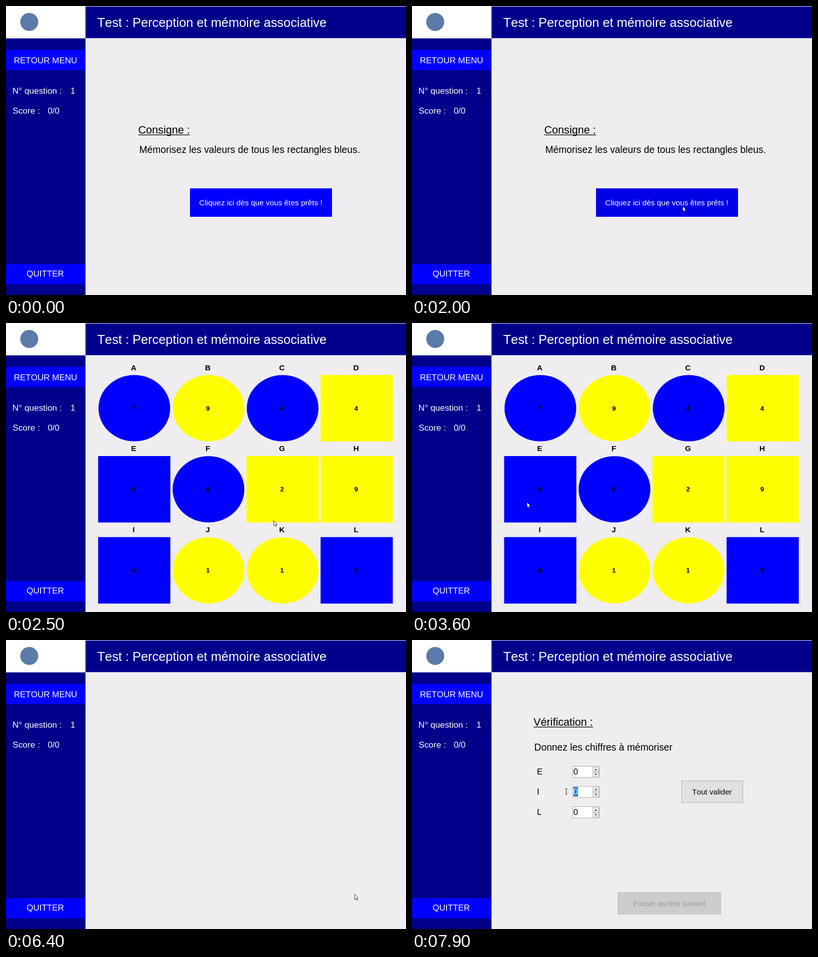
Write an HTML page that moves like this. It is 800 px wide and 580 px high and loops after 8000 ms.

```html
<!DOCTYPE html>
<html lang="fr">
<head>
<meta charset="utf-8">
<title>Perception et mémoire associative</title>
<style>
  html, body { margin: 0; width: 100%; height: 100%; overflow: hidden; background: #efedf0; }
  svg { display: block; width: 800px; height: 580px; }
  text { font-family: "Liberation Sans", Arial, sans-serif; font-kerning: none; white-space: pre; }
</style>
</head>
<body>
<svg id="stage" viewBox="0 0 800 580" xmlns="http://www.w3.org/2000/svg"></svg>
<script>
const NS = "http://www.w3.org/2000/svg";
const LOOP = 8000, STEP = 100;
const NAVY = "#00008b", BLUE = "#0000ff", YELLOW = "#ffff00";
const stage = document.getElementById("stage");

function add(parent, tag, attrs, content) {
  const node = document.createElementNS(NS, tag);
  for (const key in attrs) node.setAttribute(key, attrs[key]);
  if (content !== undefined) node.textContent = content;
  parent.appendChild(node);
  return node;
}
const group = () => add(stage, "g", {});
const box = (parent, x, y, width, height, fill, extra) =>
  add(parent, "rect", { x, y, width, height, fill, ...extra });
const label = (parent, content, x, y, size, fill = "#000", extra) =>
  add(parent, "text", { x, y, "font-size": size, fill, ...extra }, content);
const centred = { "text-anchor": "middle" };
const show = (node, on) => node.setAttribute("visibility", on ? "visible" : "hidden");

function heading(parent, content, x, y, width) {
  label(parent, content, x, y, 21.6);
  box(parent, x, y + 2, width, 1.3, "#000");
}

// Frame of the application
function buildShell() {
  const g = group();
  box(g, 0, 0, 800, 580, "#efedf0");
  box(g, 0, 0, 159, 65, "#fff");
  add(g, "circle", { cx: 46.5, cy: 32, r: 18, fill: "#5b7ba8" });
  box(g, 159, 1, 641, 63.5, NAVY);
  box(g, 0, 65, 159, 515, NAVY);
  box(g, 0, 88, 159, 40.5, BLUE);
  box(g, 0, 518, 159, 40.5, BLUE);
  label(g, "Test : Perception et mémoire associative", 182.5, 41.5, 25.4, "#fff");
  label(g, "RETOUR MENU", 79, 115, 17, "#fff", centred);
  label(g, "N° question :", 12.7, 176, 17.3, "#fff");
  label(g, "1", 129, 176, 17, "#fff");
  label(g, "Score :", 13.2, 216, 17.3, "#fff");
  label(g, "0/0", 83.4, 216, 17, "#fff");
  label(g, "QUITTER", 78.5, 543, 17, "#fff", centred);
}

function buildIntro() {
  const g = group();
  heading(g, "Consigne :", 264.5, 256, 103.5);
  label(g, "Mémorisez les valeurs de tous les rectangles bleus.", 266.5, 294.5, 19.3);
  const ready = box(g, 368, 366, 284, 57, BLUE);
  label(g, "Cliquez ici dès que vous êtes prêts !", 386.3, 400, 15.4, "#fff");
  return { g, ready };
}

// Each cell: round or square, blue or yellow, digit
function buildGrid() {
  const g = group();
  const cells = "rb7 ry9 rb4 sy4 sb0 rb6 sy2 sy9 sb4 ry1 ry1 sb9".split(" ");
  const bold = { ...centred, "font-weight": "bold" };
  cells.forEach(([shape, colour, digit], i) => {
    const col = i % 4, row = Math.floor(i / 4);
    const cx = 256.3 + col * 148.3, cy = 171 + row * 162.7;
    const fill = colour === "b" ? BLUE : YELLOW;
    if (shape === "r") add(g, "ellipse", { cx: cx + 0.4, cy, rx: 71.7, ry: 66.5, fill });
    else box(g, cx - 72, cy - 66.7, 144.4, 133.4, fill);
    label(g, "ABCDEFGHIJKL"[i], cx - 1, 95 + row * 162.3, 15.4, "#000", bold);
    label(g, digit, cx - 0.8, 175.5 + row * 162.6, 13, "#000", bold);
  });
  return g;
}

function spinner(g, name, y) {
  label(g, name, 250, y + 17, 17);
  box(g, 321.5, y + 0.5, 53, 22.5, "#fff", { stroke: "#a9a9a9" });
  for (const dy of [2, 12]) {
    box(g, 361.5, y + dy + 0.3, 12, 9, "#efefef", { stroke: "#adadad", "stroke-width": 0.8 });
    const tip = dy === 2 ? -3 : 3, mid = y + dy + 5;
    add(g, "path", { d: `M365 ${mid - tip / 2}h5l-2.5 ${tip}z`, fill: "#333" });
  }
  return label(g, "0", 322.7, y + 17, 16.5);
}

function buildCheck() {
  const g = group();
  heading(g, "Vérification :", 243, 172, 119);
  label(g, "Donnez les chiffres à mémoriser", 244.5, 222, 19.3);
  spinner(g, "E", 253);
  const digit = spinner(g, "I", 293);
  spinner(g, "L", 334);
  const mark = box(g, 323, 295, 9, 19, "#0078d7");
  g.insertBefore(mark, digit);
  const submit = box(g, 539.5, 282.8, 122, 43.5, "#e1e1e1", { stroke: "#adadad" });
  label(g, "Tout valider", 600, 310, 15.2, "#000", centred);
  box(g, 411.5, 506.5, 206, 43.5, "#cccccc", { stroke: "#bfbfbf" });
  label(g, "Passer au test suivant", 514.5, 533.5, 14.8, "#9b9b9b", centred);
  return { g, digit, mark, submit };
}

buildShell();
const intro = buildIntro();
const grid = buildGrid();
const check = buildCheck();
const arrow = add(stage, "path", {
  d: "M.5 .5V11L2.8 8.9L4.4 12.4L6 11.7L4.5 8.3H7.4Z",
  fill: "#fff", stroke: "#111", "stroke-width": 0.8
});
const beam = add(stage, "path", {
  d: "M-2.5 -5.5H-.6M.6 -5.5H2.5M0 -5V5M-2.5 5.5H-.6M.6 5.5H2.5",
  stroke: "#222", fill: "none"
});

// Pointer stops: time, x, y
const route = [
  [200, 564, 5], [600, 750, 170], [900, 685, 286], [1000, 693, 272],
  [1200, 690, 267], [1400, 669, 276], [1700, 580, 385], [1900, 545, 402],
  [2300, 535, 396], [3000, 535, 396], [3250, 756, 410], [3550, 255, 324],
  [3750, 190, 548], [3900, 286, 505], [4600, 697, 510], [6700, 697, 510],
  [7100, 400, 23], [7350, 121, 200], [7600, 335, 300], [7700, 335, 304],
  [7800, 322, 304], [7900, 308.5, 304]
];

function slope(i, axis) {
  const rate = k => (route[k + 1][axis] - route[k][axis]) / (route[k + 1][0] - route[k][0]);
  if (i === 0 || i === route.length - 1) return 0;
  const a = rate(i - 1), b = rate(i);
  return a * b > 0 ? 2 * a * b / (a + b) : 0;
}

// Cubic between stops that never overshoots them
function along(t, axis) {
  const last = route.length - 1;
  if (t >= route[last][0]) return route[last][axis];
  let i = 0;
  while (t >= route[i + 1][0]) i++;
  const span = route[i + 1][0] - route[i][0];
  const u = (t - route[i][0]) / span, v = 1 - u;
  return route[i][axis] * v * v * (1 + 2 * u) + route[i + 1][axis] * u * u * (3 - 2 * u)
    + span * u * v * (slope(i, axis) * v - slope(i + 1, axis) * u);
}

function draw(time) {
  const t = Math.floor((time % LOOP) / STEP) * STEP;
  const moving = t >= 200, editing = t >= 7600;
  const x = moving ? along(t, 1) : 0, y = moving ? along(t, 2) : 0;

  show(intro.g, t < 2300);
  show(grid, t >= 2500 && t < 6400);
  show(check.g, t >= 6500);

  const over = x >= 368 && x < 652 && y >= 366 && y < 423;
  intro.ready.setAttribute("fill", over ? "#0000e5" : BLUE);

  const focused = t < 7700;
  check.submit.setAttribute("stroke", focused ? "#0078d7" : "#adadad");
  check.submit.setAttribute("stroke-width", focused ? 2 : 1);
  const selected = t >= 7800;
  check.mark.setAttribute("fill", selected ? "#0078d7" : "none");
  check.digit.setAttribute("fill", selected ? "#fff" : "#000");

  show(arrow, moving && !editing);
  show(beam, editing);
  (editing ? beam : arrow).setAttribute("transform", `translate(${x.toFixed(1)} ${y.toFixed(1)})`);
}

function tick(now) {
  draw(now);
  requestAnimationFrame(tick);
}
draw(0);
requestAnimationFrame(tick);
</script>
</body>
</html>
```
